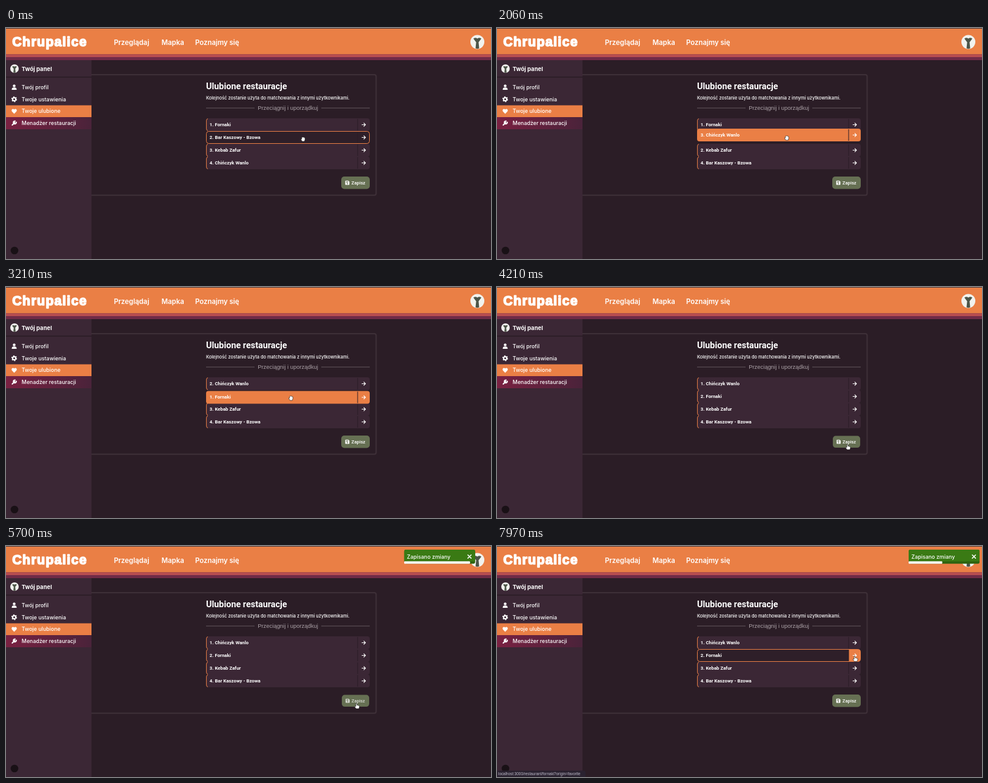
An HTML page that plays this animation: 800 by 381 pixels, repeating every 8 s.

```html
<!DOCTYPE html>
<html lang="pl">
<head>
<meta charset="utf-8">
<title>Ulubione restauracje</title>
<style>
  html, body { margin: 0; width: 100%; height: 100%; overflow: hidden; background: #2b1d26; }
  svg { display: block; width: 100%; height: 100%; }
  text { font-family: Roboto, sans-serif; fill: #fff; white-space: pre; }
  .bold { font-weight: 700; }
  .nav { font: 600 11.4px Inter, sans-serif; }
  .logo { font: 700 21.6px "Liberation Sans", Arial, sans-serif; letter-spacing: 1.2px; stroke: #fff; stroke-width: 1.6; stroke-linejoin: round; }
  .menu { font: 500 8.9px Inter, sans-serif; }
  .panel { font: 700 9.5px Inter, sans-serif; }
  .hint { font: 500 7.4px Inter, sans-serif; }
  .divider { font: 400 9.45px "Liberation Sans", Arial, sans-serif; fill: #aaa0a6; }
  .status { font: 400 6.35px "Liberation Sans", Arial, sans-serif; fill: #c0bccb; }
  .line { fill: none; stroke: #fff; stroke-linecap: round; stroke-linejoin: round; }
</style>
</head>
<body>
<svg viewBox="0 0 800 381">
  <defs>
    <linearGradient id="manager"><stop stop-color="#7a2142"/><stop offset="1" stop-color="#4a233a"/></linearGradient>
    <g id="avatar">
      <circle r="11.5" fill="#f1f2ee"/>
      <path d="M-6.5-5.5Q-3-8 0-5.5Q3-8 6.5-5.5L2 .5L3 10.5Q0 12-3 10.5L-2 .5Z" fill="#4c5548"/>
    </g>
    <path id="arrow" class="line" stroke-width="1.2" d="M-2.8 0H2.8M.3-2.6L2.9 0L.3 2.6"/>
    <g id="disk">
      <path d="M-3-3H1.8L3-1.8V3H-3Z" fill="#fff" stroke="#fff" stroke-width=".8" stroke-linejoin="round"/>
      <path d="M-1.9-2.1H1.2V-.5H-1.9Z" fill="#667053"/><circle cy="1.4" r="1" fill="#667053"/>
    </g>
    <g id="grab" fill="#fff" stroke="#111" stroke-width=".6" stroke-linejoin="round">
      <path d="M-1.5 4L-3.6.8Q-3.7-.5-2.2.2V-2.4Q-1.6-3.5-.9-2.6Q-.2-4 .6-2.8Q1.5-3.6 2-2.2Q3.2-2.5 3.2-1V1.2L2.2 4Z"/>
    </g>
    <g id="pointer" fill="#fff" stroke="#111" stroke-width=".6" stroke-linejoin="round">
      <path d="M-.9 1Q0-.6.9 1V3.6Q1.8 3 2.4 3.9Q3.3 3.4 3.7 4.3Q4.9 4.1 4.9 5.3V7L4 9.3H-.6L-3 6Q-2.9 4.6-.9 5.6Z"/>
    </g>
    <path id="plain" d="M0 0V9L2.1 7.1L3.5 10L4.9 9.4L3.6 6.5H6.4Z" fill="#fff" stroke="#111" stroke-width=".6"/>
  </defs>

  <rect width="800" height="381" fill="#2b1d26"/>
  <rect x="100" y="77" width="510.5" height="198.8" rx="3" fill="none" stroke="#3e3038" stroke-width="2"/>

  <rect y="53" width="141" height="328" fill="#3b2735"/>
  <rect y="80" width="141" height="2" fill="#2d1e28"/>
  <rect y="127.5" width="141" height="19.5" fill="#ea7f45"/>
  <rect y="147" width="141" height="20" fill="url(#manager)"/>
  <use href="#avatar" transform="translate(14 67) scale(.61)"/>
  <text class="panel" x="25.7" y="70.5">Twój panel</text>
  <g id="menu"></g>
  <g fill="#fff">
    <circle cx="13.5" cy="95.5" r="2.2"/><path d="M9.5 102Q9.5 98.3 12 98.3H15Q17.5 98.3 17.5 102Z"/>
    <circle cx="13.5" cy="117.5" r="2.6" fill="none" stroke="#fff" stroke-width="2"/>
    <circle cx="13.5" cy="117.5" r="4" fill="none" stroke="#fff" stroke-width="1.4" stroke-dasharray="2.09 2.09"/>
    <path d="M13.5 141.5L9.8 137.8Q8.4 135.6 10 134Q12 132.7 13.5 134.6Q15 132.7 17 134Q18.6 135.6 17.2 137.8Z"/>
    <path class="line" stroke-width="2" d="M10.3 160L14.5 155.8M17 155.6A2.4 2.4 0 1 1 14.9 153.4"/>
  </g>
  <circle cx="14" cy="367" r="6.3" fill="#191116"/>

  <rect width="800" height="1.2" fill="#3c3940"/>
  <rect y="1" width="800" height="42.5" fill="#ea7f45"/>
  <rect y="43.3" width="800" height="5" fill="#b84d50"/>
  <rect y="48" width="800" height="5" fill="#712b47"/>
  <text class="logo" x="10.3" y="30">Chrupalice</text>
  <text class="nav" x="178" y="27.8">Przeglądaj</text>
  <text class="nav" x="256.5" y="27.8">Mapka</text>
  <text class="nav" x="312" y="27.8">Poznajmy się</text>
  <use href="#avatar" x="777.5" y="23"/>

  <text class="bold" x="330" y="101" font-size="14.4">Ulubione restauracje</text>
  <text class="hint" x="330" y="117.6">Kolejność zostanie użyta do matchowania z innymi użytkownikami.</text>
  <path d="M330 132H410M520 132H600" stroke="#65585f"/>
  <text class="divider" x="465" y="135.3" text-anchor="middle">Przeciągnij i uporządkuj</text>

  <g id="rows"></g>
  <g id="save">
    <rect x="-23.5" y="-10.2" width="47" height="20.4" rx="5" fill="#667053"/>
    <g id="saveLabel"><use href="#disk" x="-13.5"/><text x="-6.7" y="2.8" font-size="7.7" font-weight="500">Zapisz</text></g>
  </g>
  <g id="toast">
    <rect x="679" y="6" width="117" height="23.3" rx="3" fill="#2f6410"/>
    <path d="M679 25.3V9Q679 6 682 6H793Q796 6 796 9V25.3Z" fill="#3a7a14"/>
    <text class="menu" x="683.5" y="20.9">Zapisano zmiany</text>
    <path class="line" stroke-width="1.5" d="M784 14.7L789.4 20.1M789.4 14.7L784 20.1"/>
    <rect id="progress" x="679" y="25.2" height="4.1" rx="1" fill="#fff"/>
  </g>
  <g id="status">
    <path d="M0 370.5H143Q146 370.5 146 373.5V381H0Z" fill="#2a2230"/>
    <text class="status" x="2" y="378">localhost:3000/restaurant/fornaki?origin=favorite</text>
  </g>
  <use id="cursor"/>
</svg>

<script>
const LOOP = 8000, ROW = 21, LEFT = 330, TOP = 149, WIDTH = 270, ARROW_X = 250;
const ORANGE = '#ea7f45';
const get = id => document.getElementById(id);
const clamp = v => Math.max(0, Math.min(1, v));
const smooth = v => (v = clamp(v), v * v * (3 - 2 * v));
const easeOut = v => 1 - (1 - clamp(v)) ** 3;

const start = ['Fornaki', 'Bar Kaszowy - Bzowa', 'Kebab Zafur', 'Chińczyk Wanlo'];
const drags = [
  { from: 1, to: 3, begin: 250, end: 880 },
  { from: 2, to: 1, begin: 1480, end: 2230 },
  { from: 0, to: 1, begin: 2700, end: 3380 },
];
// [time, x, y] of the mouse hotspot
const path = [
  [0, 490, 183], [250, 490, 183], [800, 484, 224], [900, 484, 223], [1060, 484, 217],
  [1400, 481, 206], [1500, 481, 206], [2060, 478, 181], [2250, 477, 183],
  [2600, 472, 160.5], [2730, 472, 160.5], [3210, 470, 183], [3400, 470, 182],
  [4080, 578, 259], [6620, 578, 259], [7250, 590, 181], [8000, 590, 181],
];
const TOAST_IN = 5340, BOUNCE = 700, TOAST_LIFE = 5000;
const bounce = [[0, 1000], [.6, -25], [.75, 10], [.9, -5], [1, 0]];

function tween(keys, t, ease) {
  let i = 1;
  while (i < keys.length - 1 && t > keys[i][0]) i++;
  const [a, b] = [keys[i - 1], keys[i]];
  const k = ease((t - a[0]) / (b[0] - a[0]));
  return a.slice(1).map((v, n) => v + (b[n + 1] - v) * k);
}

const mouseAt = t => tween(path, t, smooth);
const dragOffset = (d, t) => mouseAt(t)[1] - mouseAt(d.begin)[1];

function layout(t) {
  const order = start.slice();
  let rows, held = null;
  const place = () => rows = order.map((name, i) => ({ name, label: i + 1, y: TOP + i * ROW }));
  place();
  for (const d of drags) {
    if (t < d.begin) break;
    if (t < d.end) {
      held = rows[d.from];
      const offset = dragOffset(d, t), dir = Math.sign(d.to - d.from);
      for (let i = d.from + dir, n = 1; i !== d.to + dir; i += dir, n++)
        rows[i].y -= dir * ROW * smooth((offset * dir / ROW - n + .65) / .35);
      held.y += offset;
    } else {
      const dropped = order.splice(d.from, 1)[0];
      order.splice(d.to, 0, dropped);
      place();
      const gap = dragOffset(d, d.end) - (d.to - d.from) * ROW;
      rows[d.to].y += gap * (1 - easeOut((t - d.end) / 200));
    }
  }
  return { rows, held };
}

function rowMarkup({ name, label, y }, held, hover, arrowHover) {
  const fill = held ? ORANGE : hover ? '#2e1f29' : '#3b2735';
  const edge = held ? '' : hover
    ? `<rect x=".5" y=".5" width="${WIDTH - 1}" height="20" rx="4" fill="none" stroke="${ORANGE}"/>`
    : `<path d="M3 .6Q.6 .8 .6 4V17Q.6 20.2 3 20.4" fill="none" stroke="${ORANGE}"/>`;
  return `<g transform="translate(${LEFT} ${y})">
    <rect width="${WIDTH}" height="${ROW}" rx="4" fill="${fill}"/>
    ${arrowHover ? `<path d="M250 .5H266Q269.5 .5 269.5 4V17Q269.5 20.5 266 20.5H250Z" fill="${ORANGE}"/>` : ''}
    <path d="M${ARROW_X} 1V20" stroke="#2b1d26"/>${edge}
    <text class="bold" x="5.8" y="12.9" font-size="7.8">${label}. ${name}</text>
    <use href="#arrow" x="260" y="10.5"/></g>`;
}

function draw(t) {
  const [x, y] = mouseAt(t);
  const { rows, held } = layout(t);
  const inList = x >= LEFT && x < LEFT + WIDTH && y >= TOP && y < TOP + 4 * ROW;
  const slot = inList && !held ? Math.floor((y - TOP) / ROW) : -1;
  const onArrow = slot >= 0 && x > LEFT + ARROW_X;
  const onSave = x > 553 && x < 600 && y > 245 && y < 266;

  const markup = rows.map((row, i) => [row === held || i === slot, rowMarkup(row, row === held, i === slot, i === slot && onArrow)]);
  get('rows').innerHTML = markup.sort((a, b) => a[0] - b[0]).map(m => m[1]).join('');

  get('save').setAttribute('transform', `translate(576.5 255.3) scale(${onSave ? .96 : 1})`);
  get('saveLabel').setAttribute('opacity', t > 4950 && t < 6300 ? .75 : 1);

  const age = t - TOAST_IN;
  get('toast').setAttribute('visibility', age < 0 ? 'hidden' : 'visible');
  get('toast').setAttribute('transform', `translate(${tween(bounce, clamp(age / BOUNCE), easeOut)[0]} 0)`);
  get('progress').setAttribute('width', 117 * clamp(1 - age / TOAST_LIFE));
  get('status').setAttribute('visibility', onArrow && slot === 1 ? 'visible' : 'hidden');

  const shape = onSave || onArrow ? 'pointer' : held || inList ? 'grab' : 'plain';
  get('cursor').setAttribute('href', '#' + shape);
  get('cursor').setAttribute('transform', `translate(${x} ${y})`);
}

get('menu').innerHTML = ['Twój profil', 'Twoje ustawienia', 'Twoje ulubione', 'Menadżer restauracji']
  .map((label, i) => `<text class="menu" x="25.8" y="${101 + i * 19.7}">${label}</text>`).join('');

function frame() {
  draw(performance.now() % LOOP);
  requestAnimationFrame(frame);
}
frame();
</script>
</body>
</html>
```
